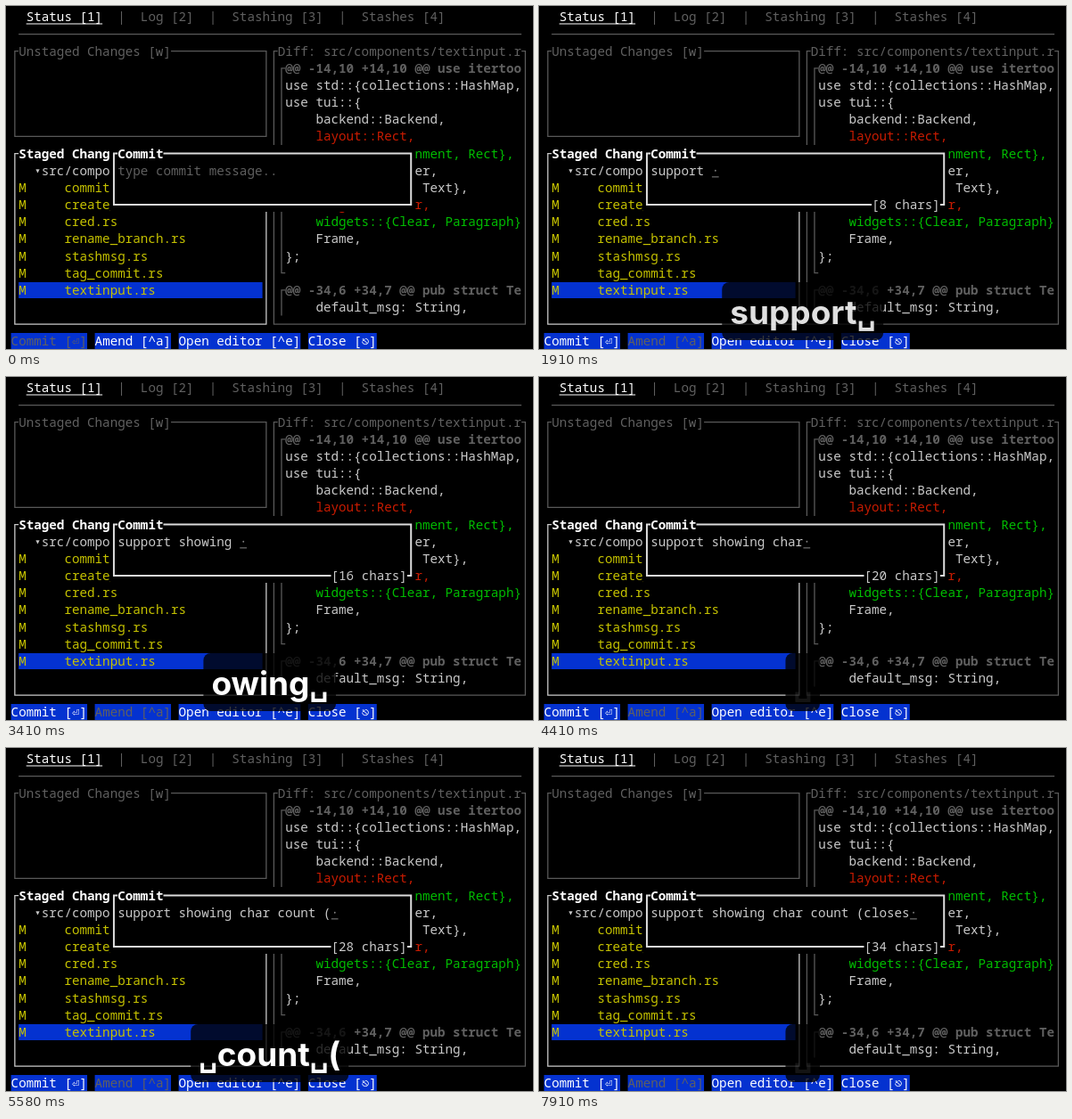
An HTML page for the animation above (7.99 s loop, 591 px wide and 385 px high).

```html
<!DOCTYPE html>
<html lang="en">
<head>
<meta charset="utf-8">
<title>Commit message typing</title>
<style>
  html, body { margin: 0; width: 100%; height: 100%; overflow: hidden; background: #000; }
  svg { display: block; width: 591px; height: 385px; }
  text { white-space: pre; }
  .cell { font: 500 14.24px "Noto Sans Mono", "DejaVu Sans Mono", monospace; }
  .bold { font-weight: 700; }
  .caption { font: 700 37px Inter, "Liberation Sans", sans-serif; fill: #fff; text-anchor: middle; }
  .caption tspan.space { font-family: "DejaVu Sans Mono", monospace; font-size: 34px; }
</style>
</head>
<body>
<svg id="stage" viewBox="0 0 591 385" width="591" height="385"></svg>
<script>
const CELL = 8.545, ROW = 19.15, LEFT = 5.6, MIDDLE = 12.4;
const LOOP = 7990, TICKS_PER_MS = 12 / 1000, LAST_TICK = 95;
const CAPTION_X = 295.7;
const C = {
  text: "#cacaca", bright: "#ffffff", dim: "#606060", line: "#595959",
  yellow: "#c5c200", red: "#c91b00", green: "#00bd00", blue: "#0432d0"
};

const stage = document.getElementById("stage");
const colX = col => LEFT + col * CELL;
const midX = col => colX(col) + CELL / 2;
const midY = row => MIDDLE + row * ROW;

function add(tag, attrs, parent = stage) {
  const node = document.createElementNS("http://www.w3.org/2000/svg", tag);
  for (const key in attrs) node.setAttribute(key, attrs[key]);
  parent.appendChild(node);
  return node;
}

function put(col, row, string, fill = C.text, bold = false) {
  const node = add("text", {
    x: colX(col), y: midY(row) + 5, fill, class: bold ? "cell bold" : "cell"
  });
  node.textContent = string;
  return node;
}

function fillCells(col, row, cols, rows, fill) {
  return add("rect", {
    x: colX(col), y: Math.round(midY(row) - 9.2), width: cols * CELL,
    height: Math.floor(rows * ROW - 1), fill
  });
}

function path(d, stroke, width = 1.3) {
  return add("path", { d, stroke, "stroke-width": width, fill: "none" });
}

function pane(left, top, right, bottom, title, color, bold, width) {
  path(`M${midX(left)} ${midY(top)}H${midX(right)}V${midY(bottom)}H${midX(left)}Z`, color, width);
  fillCells(left + 1, top, title.length, 1, "#000");
  put(left + 1, top, title, bold ? C.bright : C.dim, bold);
}

// Tabs
put(2, 0, "Status [1]", C.bright);
path(`M${colX(2)} 20H${colX(12)}`, C.bright, 1.2);
put(14, 0, "|  Log [2]  |  Stashing [3]  |  Stashes [4]", C.dim);
path(`M${colX(1)} ${midY(1)}H${colX(67)}`, C.line);

// Panes
pane(0, 2, 33, 7, "Unstaged Changes [w]", C.line, false);
pane(0, 8, 33, 18, "Staged Changes [s]", C.text, true);
pane(34, 2, 67, 18, "Diff: src/components/textinput.r", C.line, false);

// Staged files
put(3, 9, "▾");
put(4, 9, "src/components");
fillCells(1, 16, 32, 1, C.blue);
["commit.rs", "create_branch.rs", "cred.rs", "rename_branch.rs",
 "stashmsg.rs", "tag_commit.rs", "textinput.rs"].forEach((name, i) => {
  put(1, 10 + i, "M", C.yellow);
  put(7, 10 + i, name, C.yellow);
});

// Diff
[["@@ -14,10 +14,10 @@ use itertoo", C.dim],
 ["use std::{collections::HashMap,"],
 ["use tui::{"],
 ["    backend::Backend,"],
 ["    layout::Rect,", C.red],
 ["    layout::{Alignment, Rect},", C.green],
 ["    style::Modifier,"],
 ["    text::{Spans, Text},"],
 ["    widgets::Clear,", C.red],
 ["    widgets::{Clear, Paragraph}", C.green],
 ["    Frame,"],
 ["};"],
 [""],
 ["@@ -34,6 +34,7 @@ pub struct Te", C.dim],
 ["    default_msg: String,"]
].forEach(([string, color], i) => put(36, 3 + i, string, color, color === C.dim));
const gutter = midX(35), gutterEnd = colX(36);
path(`M${gutterEnd} ${midY(3)}H${gutter}V${midY(15)}H${gutterEnd}` +
     `M${gutterEnd} ${midY(16)}H${gutter}V${midY(17) + ROW / 2}`, C.line);

// Commit popup
fillCells(13, 8, 40, 4, "#000");
pane(13, 8, 52, 11, "Commit", "#dcdcdc", true, 2);
const message = put(14, 9, "");
const cursor = add("g", {});
add("circle", { cx: CELL / 2, cy: midY(9), r: 0.9, fill: "#858585" }, cursor);
add("rect", { x: 0.3, y: midY(9) + 6.6, width: CELL - 0.8, height: 1, fill: "#858585" }, cursor);
const countBack = fillCells(43, 11, 9, 1, "#000");
const count = put(43, 11, "");

// Command bar
const [commit, amend] = [[0, "Commit [⏎]"], [11, "Amend [^a]"],
  [22, "Open editor [^e]"], [39, "Close [⎋]"]].map(([col, label]) => {
  fillCells(col, 19, label.length, 1, C.blue);
  return put(col, 19, label, C.bright);
});

// Keystroke caption
const captionBox = add("rect", { y: 310, height: 65, rx: 8, fill: "#000" });
const captionText = add("text", { x: CAPTION_X, y: 357, class: "caption" });

const MESSAGE = "support showing char count (closes";
const ECHO = [3, 4, 6, 7, 9, 10, 12, 13, 25, 27, 33, 35, 36, 38, 39, 41, 43, 44, 45, 46,
  54, 55, 56, 57, 59, 60, 65, 67, 81, 82, 83, 84, 85, 86];
const CAPTIONS = [
  { text: "support␣", keys: [2, 3, 5, 6, 8, 9, 11, 12], fade: 23 },
  { text: "owing␣char", keys: [32, 34, 35, 37, 38, 40, 42, 43, 44, 45] },
  { text: "␣count␣(", keys: [53, 54, 55, 56, 58, 59, 64, 67], fade: 77 },
  { text: "closes", keys: [80, 81, 82, 83, 84, 85] },
  { text: "␣", keys: [95] }
];
const BOX_ALPHA = 0.78;
const TEXT_IN = [0.08, 0.6], TEXT_OUT = [0.88, 0.5, 0.1], BOX_OUT = [1, 0.5, 0.05];
const passed = (ticks, tick) => ticks.filter(k => k <= tick).length;

function drawMessage(tick) {
  const n = passed(ECHO, tick);
  const label = `[${n} chars]`;
  const start = 52 - label.length;
  message.textContent = n ? MESSAGE.slice(0, n) : "type commit message..";
  message.setAttribute("fill", n ? C.text : C.dim);
  cursor.setAttribute("transform", `translate(${colX(14 + n)} 0)`);
  count.textContent = n ? label : "";
  count.setAttribute("x", colX(start));
  countBack.setAttribute("x", colX(start));
  countBack.setAttribute("width", n ? label.length * CELL : 0);
  cursor.setAttribute("visibility", n ? "visible" : "hidden");
  commit.setAttribute("fill", n ? C.bright : C.dim);
  amend.setAttribute("fill", n ? C.dim : C.bright);
}

function drawCaption(tick) {
  const current = CAPTIONS.filter(c => c.keys[0] <= tick).pop() || { text: "", keys: [0], fade: -9 };
  const fading = current.fade <= tick;
  const since = tick - (fading ? current.fade : current.keys[0]);
  const textAlpha = fading ? TEXT_OUT[since] || 0 : TEXT_IN[since] || 1;
  const boxAlpha = fading ? BOX_OUT[since] || 0 : 1;
  const string = current.text.slice(0, passed(current.keys, tick));
  captionText.innerHTML = string.replace(/␣/g, '<tspan class="space">␣</tspan>');
  captionText.setAttribute("opacity", textAlpha);
  const width = captionText.getComputedTextLength() + 18;
  captionBox.setAttribute("x", CAPTION_X - width / 2);
  captionBox.setAttribute("width", width);
  captionBox.setAttribute("opacity", boxAlpha * BOX_ALPHA);
}

function draw(ms) {
  const tick = Math.min(LAST_TICK, Math.floor((ms % LOOP) * TICKS_PER_MS + 0.1));
  drawMessage(tick);
  drawCaption(tick);
}

const begin = performance.now();
function loop() {
  draw(performance.now() - begin);
  requestAnimationFrame(loop);
}
loop();
</script>
</body>
</html>
```
